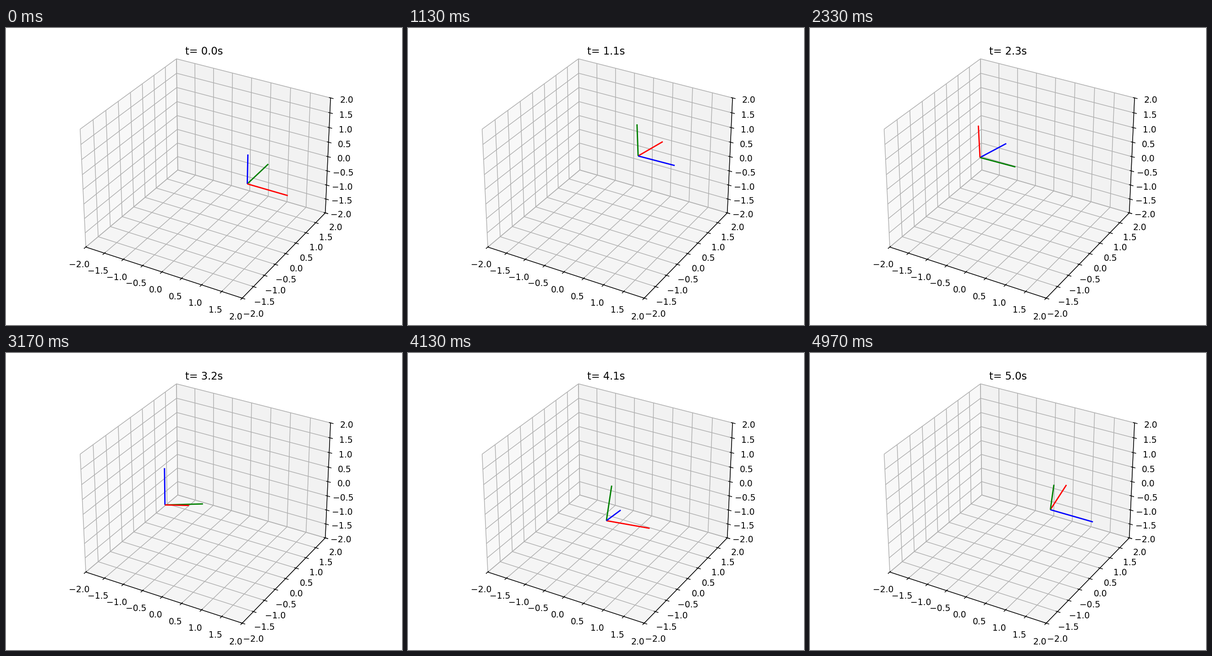
Animation of 864x648 px, one loop 5000 ms. Source, as a matplotlib script:

```python
import numpy as np
import matplotlib.pyplot as plt
from matplotlib.animation import FuncAnimation
from mpl_toolkits.mplot3d.art3d import Line3DCollection

W, H, DPI = 864, 648, 135
FPS, LOOP = 30, 5.0
FRAMES = int(FPS * LOOP)
PAD = 20.25                      # margin around the axes, px
PHASE = 1 / 120                  # the pose runs slightly ahead of the clock
SPIN = np.array([1.0, 1.0, 1.0])  # angular velocity, rad/s


def rotation(vec):
    """Rotation matrix for a rotation vector (Rodrigues)."""
    angle = np.linalg.norm(vec)
    if angle == 0:
        return np.eye(3)
    x, y, z = vec / angle
    k = np.array([[0, -z, y], [z, 0, -x], [-y, x, 0]])
    return np.eye(3) + np.sin(angle) * k + (1 - np.cos(angle)) * k @ k


def orbit(t):
    a = 2 * np.pi * t / LOOP
    return np.array([np.cos(a), np.sin(a), 0.0])


fig = plt.figure(figsize=(W / DPI, H / DPI), dpi=DPI)
ax = fig.add_axes([PAD / W, PAD / H, 1 - 2 * PAD / W, 1 - 2 * PAD / H],
                  projection="3d")
ax.set(xlim=(-2, 2), ylim=(-2, 2), zlim=(-2, 2))
clock = fig.text(0.5, 1 - 57.6 / H, "", ha="center", va="baseline", size=12)

# Collections are depth-sorted, so the nearest arm is drawn on top.
arms = [Line3DCollection([np.zeros((2, 3))], colors=c, linewidths=1.5)
        for c in ("red", "green", "blue")]
for arm in arms:
    ax.add_collection3d(arm)


def update(i):
    t = i / FPS
    pos = orbit(t + PHASE)
    rot = rotation(SPIN * (t + PHASE))
    for arm, direction in zip(arms, rot.T):
        arm.set_segments([np.array([pos, pos + direction])])
    clock.set_text(f"t= {t:.1f}s")
    return [*arms, clock]


anim = FuncAnimation(fig, update, frames=FRAMES, interval=1000 / FPS,
                     repeat=True, repeat_delay=0)
plt.show()
```
